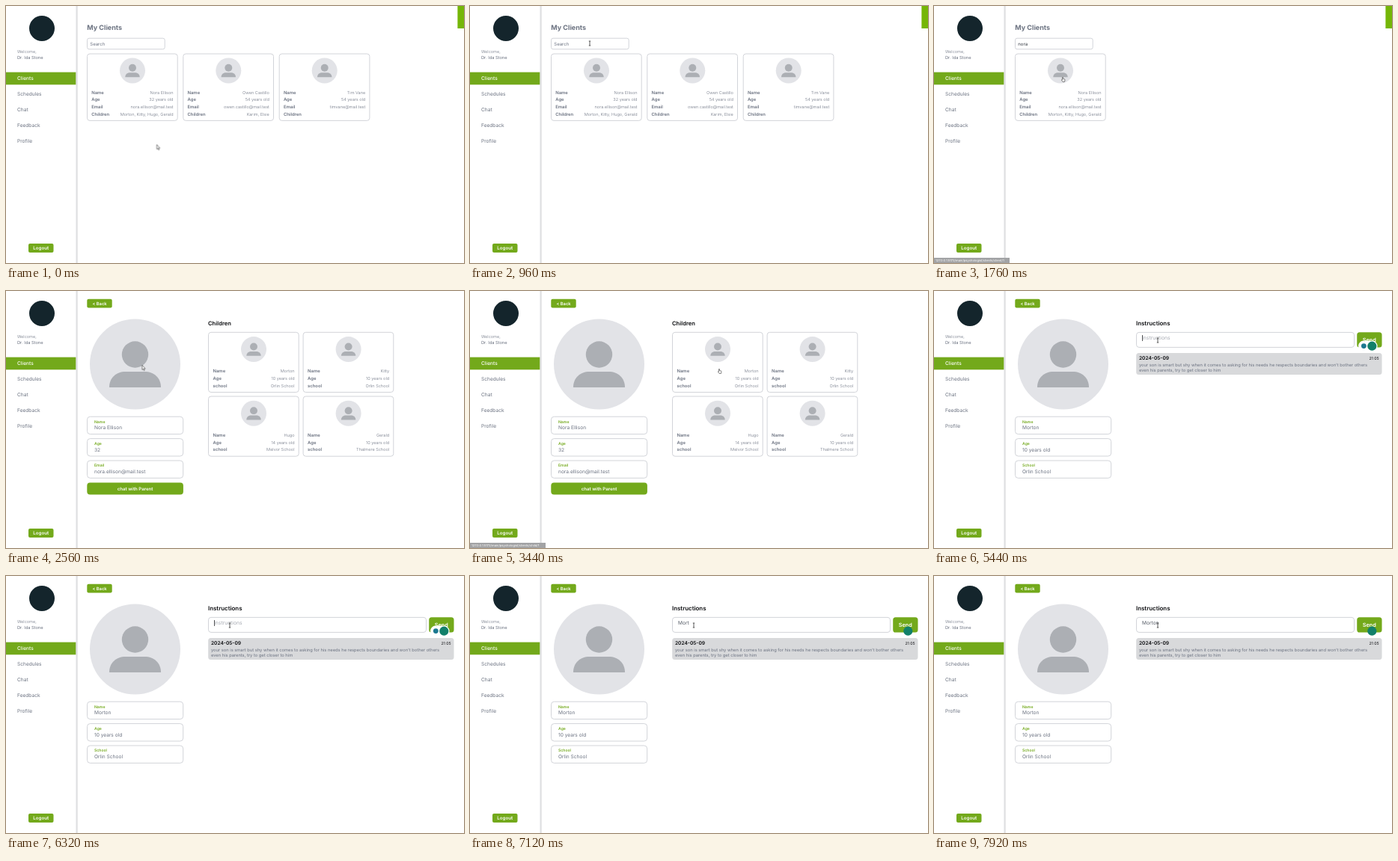
These frames come from a looping animation (612x344 px, 8000 ms). An HTML page:

```html
<!DOCTYPE html>
<html lang="en">
<head>
<meta charset="utf-8">
<title>Client dashboard</title>
<style>
html, body { margin: 0; width: 100%; height: 100%; overflow: hidden; background: #fff; }
svg { display: block; width: 612px; height: 344px; font-family: Inter, Roboto, sans-serif; fill: #6b7280; text-rendering: geometricPrecision; }
.h { font-weight: 700; }
.b { font-weight: 600; }
.m { font-weight: 500; }
.l { font-weight: 300; }
.w { fill: #fff; }
.g { fill: #73a91b; }
.k { fill: #0c0d10; }
.hint { fill: #a6aab2; }
.end { text-anchor: end; }
.mid { text-anchor: middle; }
.box { fill: #fff; stroke: #cdd0d5; stroke-width: .9; }
#cursor { animation: move 8s linear infinite; }
@keyframes move {
  0%, 1% { transform: translate(201.5px, 185.5px); }
  4% { transform: translate(190px, 134px); }
  7% { transform: translate(167px, 72px); }
  9%, 18% { transform: translate(160px, 50px); }
  20% { transform: translate(166px, 76px); }
  21.5%, 22.5% { transform: translate(172px, 95px); }
  24%, 31.9% { transform: translate(179.5px, 97px); }
  33% { transform: translate(203px, 119px); }
  35%, 36.4% { transform: translate(239px, 146px); }
  39% { transform: translate(292px, 128px); }
  42%, 46.4% { transform: translate(333px, 104px); }
  48.5% { transform: translate(314px, 76px); }
  50.5%, 53% { transform: translate(300px, 63px); }
  56%, 100% { transform: translate(299px, 66px); }
}
</style>
</head>
<body>
<svg id="stage" viewBox="0 0 612 344"></svg>
<script>
const LOOP = 8000;
let rules = '', count = 0;

// Class that is visible in each [from, to) pair of ms.
function during(...times) {
  const name = 'v' + count++;
  let frames = '0%{visibility:hidden}';
  times.forEach((t, i) => {
    frames += `${t / LOOP * 100}%{visibility:${i % 2 ? 'hidden' : 'visible'}}`;
  });
  rules += `@keyframes ${name}{${frames}}.${name}{animation:${name} 8s step-end infinite}`;
  return name;
}

const text = (x, y, size, cls, s) => `<text x="${x}" y="${y}" font-size="${size}" class="${cls}">${s}</text>`;
const rect = (x, y, w, h, r, cls) => `<rect x="${x}" y="${y}" width="${w}" height="${h}" rx="${r}" class="${cls}"/>`;
const group = (cls, ...parts) => `<g class="${cls}">${parts.join('')}</g>`;
const button = (x, y, w, h, r, size, s) =>
  rect(x, y, w, h, r, 'g') + text(x + w / 2, y + h / 2 + size * .36, size, 'b w mid', s);

const avatar = (x, y, r) => `<g transform="translate(${x} ${y}) scale(${r / 60.5})">
  <circle r="60.5" fill="#e2e3e7"/>
  <g fill="#acafb4"><circle cy="-13" r="17.7"/>
  <path d="M-34.5 31C-34.5 18-25 10-13 10H13C25 10 34.5 18 34.5 31Z"/></g></g>`;

const rows = (x, right, y, list) => list.map(([key, value], i) =>
  text(x, y + i * 9.7, 5.9, 'b', key) + text(right, y + i * 9.7, 5.6, 'l end', value)).join('');

const clientCard = (x, name, age, email, kids) =>
  rect(x, 64, 120.7, 89.4, 3.5, 'box') + avatar(x + 60.5, 86.5, 17) +
  rows(x + 5.7, x + 115, 117.6, [['Name', name], ['Age', age + ' years old'], ['Email', email], ['Children', kids]]);

const childCard = (x, y, name, age, school) =>
  rect(x, y, 120.7, 80.2, 3.5, 'box') + avatar(x + 60.5, y + 22.8, 17) +
  rows(x + 6, x + 115, y + 53.9, [['Name', name], ['Age', age + ' years old'], ['school', school]]);

const field = (i, label, value) => {
  const y = 168.2 + i * 29.4;
  return rect(108.5, y, 128.2, 23.4, 4, 'box') + text(118, y + 8.4, 5.1, 'b g', label) +
    text(118, y + 17.2, 6.6, '', value);
};

const profile = (...fields) => button(108.3, 10.8, 33.4, 11.8, 2, 5.8, '&lt; Back') +
  avatar(172.5, 98, 60.5) + fields.map(([k, v], i) => field(i, k, v)).join('');

// One letter per key press, each kept until `end`.
const typed = (x, y, size, fill, word, times, end) =>
  `<text x="${x}" y="${y}" font-size="${size}" fill="${fill}">` +
  [...word].map((c, i) => `<tspan class="${during(times[i], end)}">${c}</tspan>`).join('') + '</text>';

const caret = (x, y, cls) => rect(x, y, .7, 8, 0, 'k ' + cls);
const status = (cls, path) => group(cls, '<path d="M0 337H101V344H0Z" fill="#a2a3a5"/>',
  text(2, 342.2, 4.1, 'w', '127.0.0.1:5173/main/psychologist/clients/' + path));

const menu = ['Clients', 'Schedules', 'Chat', 'Feedback', 'Profile'];
const sidebar = '<circle cx="48" cy="30" r="17" fill="#14252c"/>' +
  text(15, 62.8, 5.6, 'l', 'Welcome,') + text(15, 70.8, 5.7, '', 'Dr. Ida Stone') +
  rect(0, 88.6, 93.6, 16.7, 0, 'g') +
  menu.map((s, i) => text(15, 99.3 + i * 20.9, 6.6, i ? '' : 'm w', s)).join('') +
  button(30, 318, 33.5, 12, 2, 6.2, 'Logout') +
  '<rect x="93.5" width="2.2" height="344" fill="#dedfe1"/>';

const clients = group(during(0, 1880),
  text(108.3, 32, 9, 'h', 'My Clients'),
  '<rect x="603.4" width="8.6" height="30" fill="#75b607"/>',
  rect(108.5, 43.2, 103.7, 14.6, 2.5, 'box'),
  clientCard(108.5, 'Nora Ellison', 32, 'nora.ellison@mail.test', 'Morton, Kitty, Hugo, Gerald'));

const others = group(during(0, 1280),
  clientCard(236.8, 'Owen Castillo', 54, 'owen.castillo@mail.test', 'Karim, Elsie'),
  clientCard(365.2, 'Tim Vane', 54, 'timvane@mail.test', ''));

const search = group(during(0, 1120), text(112.3, 52.8, 6, '', 'Search')) +
  typed(112.3, 52.8, 6, '#2f343d', 'nora', [1120, 1280, 1360, 1440], 1880) +
  caret(112, 46.5, during(720, 960));

const client = group(during(1880, 3560),
  profile(['Name', 'Nora Ellison'], ['Age', '32'], ['Email', 'nora.ellison@mail.test']),
  button(108.3, 256.4, 128.6, 16.2, 4, 6.1, 'chat with Parent'),
  text(270, 45.7, 7.6, 'b k', 'Children'),
  childCard(270.5, 55.3, 'Morton', 10, 'Orlin School'),
  childCard(397.1, 55.3, 'Kitty', 10, 'Orlin School'),
  childCard(270.5, 141, 'Hugo', 14, 'Melvor School'),
  childCard(397.1, 141, 'Gerald', 10, 'Thalmere School'));

const child = group(during(3560, 8000),
  profile(['Name', 'Morton'], ['Age', '10 years old'], ['School', 'Orlin School']),
  text(270, 45.7, 7.9, 'b k', 'Instructions'),
  rect(270.5, 55.4, 291, 20, 3.5, 'box'),
  button(565.2, 55.2, 33.3, 20.4, 3.5, 7.3, 'Send'),
  '<rect x="270.2" y="83" width="328.3" height="29" rx="3.5" fill="#d8d9db"/>',
  text(274, 92.2, 6.6, 'b k', '2024-05-09'),
  text(594.5, 91.6, 5.2, 'k end', '21:05'),
  text(274, 101.4, 5.75, '', "your son is smart but shy when it comes to asking for his needs he respects boundaries and won't bother others"),
  text(274, 107.6, 5.75, '', 'even his parents, try to get closer to him'));

const note = group(during(3560, 6480), text(278, 65.2, 6.8, 'hint', 'Instructions')) +
  typed(278, 65.2, 6.6, '#555b66', 'Morton', [6480, 6640, 6880, 7040, 7440, 7680], 8000) +
  caret(278, 59, during(4000, 4560, 5120, 5600, 6080, 6480));

const helper = group(during(4400, 6480),
    '<rect x="567" y="66.6" width="25.6" height="14" rx="7" fill="#fff"/><circle cx="574.3" cy="73.6" r="3.4" fill="#1b7890"/>') +
  group(during(4400, 8000), '<circle cx="585.3" cy="73.7" r="6.1" fill="#12806a"/>');

const pointer = d => `<path d="${d}" fill="#fff" stroke="#333" stroke-width=".6"/>`;
const arrow = group(during(0, 640, 1520, 1680, 1880, 3120, 3560, 3920),
  pointer('M0 0V6.2L1.4 5L2.4 7.2L3.3 6.8L2.4 4.7H4.2Z'));
const hand = group(during(1680, 1880, 3120, 3560),
  pointer('M-.6 .6Q0-.3 .6 .6V2.6L2.5 3Q3.1 3.2 3 3.9L2.5 6.4H0L-1.7 4Q-1.4 3.2-.6 3.9Z'));
const beam = group(during(640, 1520, 3920, 8000),
  '<path d="M-1.2-3H1.2M0-3V3M-1.2 3H1.2" fill="none" stroke="#333" stroke-width=".8"/>');

document.getElementById('stage').innerHTML = sidebar + clients + others + search + client + child + note + helper +
  status(during(1680, 1880), 'client/1') + status(during(3200, 3760), 'child/1') +
  `<g id="cursor">${arrow}${hand}${beam}</g>`;
document.head.appendChild(document.createElement('style')).textContent = rules;
</script>
</body>
</html>
```
